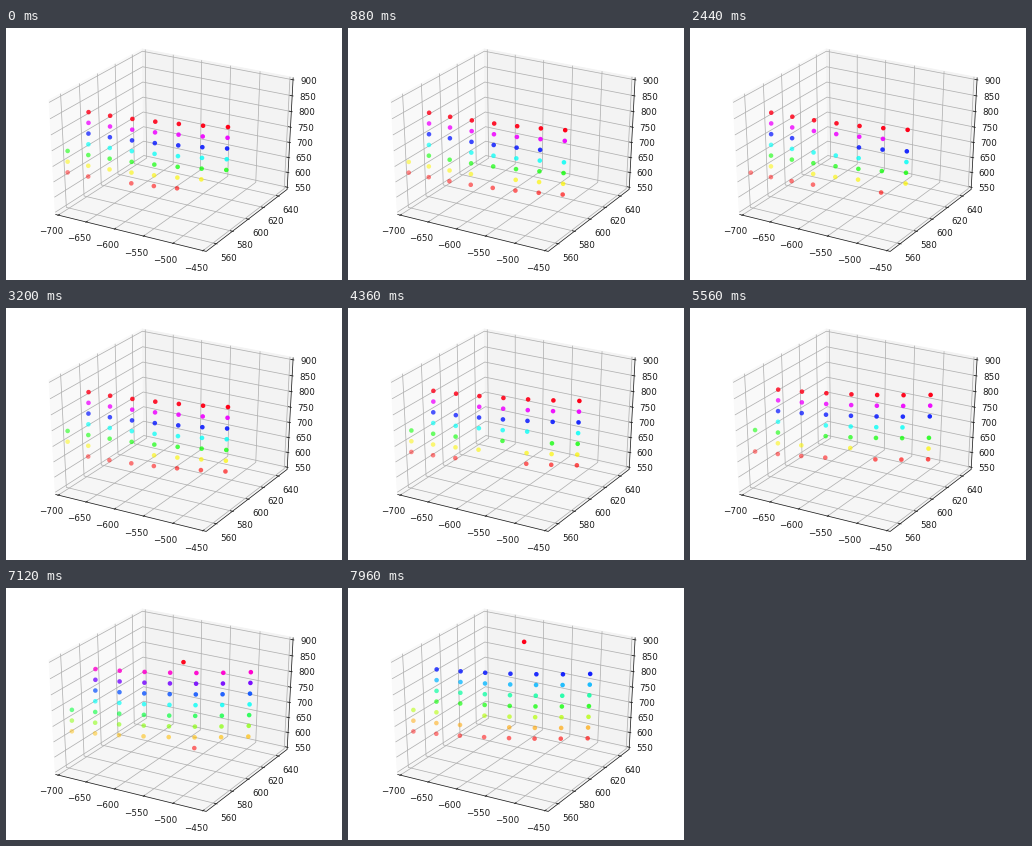
Recreate the animation shown at these times as a matplotlib script. Size 336 px wide and 252 px high, loop 8 s.

```python
import numpy as np
import matplotlib.pyplot as plt
from matplotlib.animation import FuncAnimation

W, H = 336, 252
FRAMES, STEP = 200, 40
E = 0.5 + 1 / 48          # half size of the drawn box, data spans +-0.5
SCALE = 0.92              # size of the plot relative to the stage
INK = "#1c1c1c"

plt.rcParams["font.family"] = "DejaVu Sans"
fig = plt.figure(figsize=(W / 72, H / 72), dpi=72, facecolor="white")
ax = fig.add_axes([0, 0, 1, 1])
ax.set_xlim(0, W)
ax.set_ylim(H, 0)
ax.axis("off")

elev, azim = np.radians(30), np.radians(-60)
VIEW = np.array([np.cos(elev) * np.cos(azim), np.cos(elev) * np.sin(azim), np.sin(elev)])
RIGHT = np.array([-np.sin(azim), np.cos(azim), 0])
UP = np.cross(VIEW, RIGHT)


def project(*p):
    """Perspective projection from box coordinates to pixels."""
    p = np.array(p, float)
    w = 10 - p @ VIEW
    x = (p @ RIGHT / w + 0.095) / 0.185
    y = (p @ UP / w + 0.095) / 0.185
    return 8.4 + SCALE * W * x, 5.8 + SCALE * H * (1 - y)


def line(points, color, width, z):
    xs, ys = zip(*(project(*p) for p in points))
    ax.plot(xs, ys, color=color, lw=width, zorder=z, solid_capstyle="butt")


def pane(points, shade):
    ax.fill(*zip(*(project(*p) for p in points)), facecolor=shade, edgecolor=shade, lw=0.8, zorder=1)


def label(value, *p):
    x, y = project(*p)
    text = str(value).replace("-", "\u2212")
    ax.text(x, y + 5.2, text, fontsize=8.8, color=INK, ha="center", va="baseline", zorder=4)


def draw_box():
    pane([(-E, -E, -E), (-E, E, -E), (-E, E, E), (-E, -E, E)], "#f9f9f9")
    pane([(-E, E, -E), (E, E, -E), (E, E, E), (-E, E, E)], "#f3f3f3")
    pane([(-E, -E, -E), (E, -E, -E), (E, E, -E), (-E, E, -E)], "#f6f6f6")
    out, inn, far = E + 0.1 / 12, E - 0.2 / 12, E + 0.0855
    grid, tick = ("#b0b0b0", 0.75, 2), (INK, 0.75, 3)
    for v in range(-700, -449, 50):
        a = (v + 575) / 250
        line([(a, -E, -E), (a, E, -E), (a, E, E)], *grid)
        line([(a, -out, -E), (a, -inn, -E)], *tick)
        label(v, a, -far, -far)
    for v in range(560, 641, 20):
        a = (v - 600) / 100
        line([(E, a, -E), (-E, a, -E), (-E, a, E)], *grid)
        line([(out, a, -E), (inn, a, -E)], *tick)
        label(v, far, a, -far)
    for v in range(550, 901, 50):
        a = (v - 725) / 350
        line([(-E, -E, a), (-E, E, a), (E, E, a)], *grid)
        line([(out, E, a), (inn, E, a)], *tick)
        label(v, E + 0.07, E + 0.07, a)
    line([(-E, -E, -E), (E, -E, -E), (E, E, -E), (E, E, E)], *tick)


draw_box()

cols, rows = (g.ravel() for g in np.meshgrid(np.arange(8), np.arange(7), indexing="ij"))
HSV = plt.get_cmap("hsv")

# Stray detections off the board: start and end in ms, column, row
STRAYS = [(1440, 2000, 4.5, 7), (1440, 2000, 5, -1),
          (6800, 7480, 4.5, 7), (6800, 7480, 5, -1),
          (7480, 8000, 4.5, 9)]


def spot(c, r, swing):
    """Pixel position of column c, row r on the swinging board."""
    x = 63.2 + 21.4 * c + 0.33 * c**2 + (2.7 + 1.69 * c) * swing + (r / 6 - 0.5) * 0.36 * c
    y = 144 + 3.6 * c - 0.23 * c**2 - (0.7 + 1.25 * c) * swing - 10.73 * r
    return x, y


def markers(i):
    """Positions and rows of all detected markers at step i."""
    t = i * STEP
    stray = [(c, r) for start, end, c, r in STRAYS if start <= t < end]
    # Low rows drop out more often; each pattern of gaps holds for a while
    rng = np.random.default_rng(40 + i // 20)
    chance = (0.2 - 0.03 * rows) * (0.25 if stray else 1)
    seen = (rng.random(rows.size) > chance) & ((cols > 0) | (rows < 3))
    c = np.append(cols[seen], [s[0] for s in stray])
    r = np.append(rows[seen], [s[1] for s in stray])
    swing = -np.cos(np.pi * (t - 1600) / 5300)
    return *spot(c, r, swing), r


def unit(v):
    return (v - v.min()) / (v.max() - v.min())


dots = ax.scatter([], [], s=21, linewidths=0, zorder=5)


def update(i):
    x, y, r = markers(i)
    near = unit(0.1 * r + 0.0024 * x)
    rgba = HSV(unit(r))
    rgba[:, 3] = 0.46 + 0.54 * near
    order = np.argsort(near)
    dots.set_offsets(np.column_stack([x, y])[order])
    dots.set_facecolors(rgba[order])
    return (dots,)


anim = FuncAnimation(fig, update, frames=FRAMES, interval=STEP, repeat=True, repeat_delay=0)
plt.show()
```
